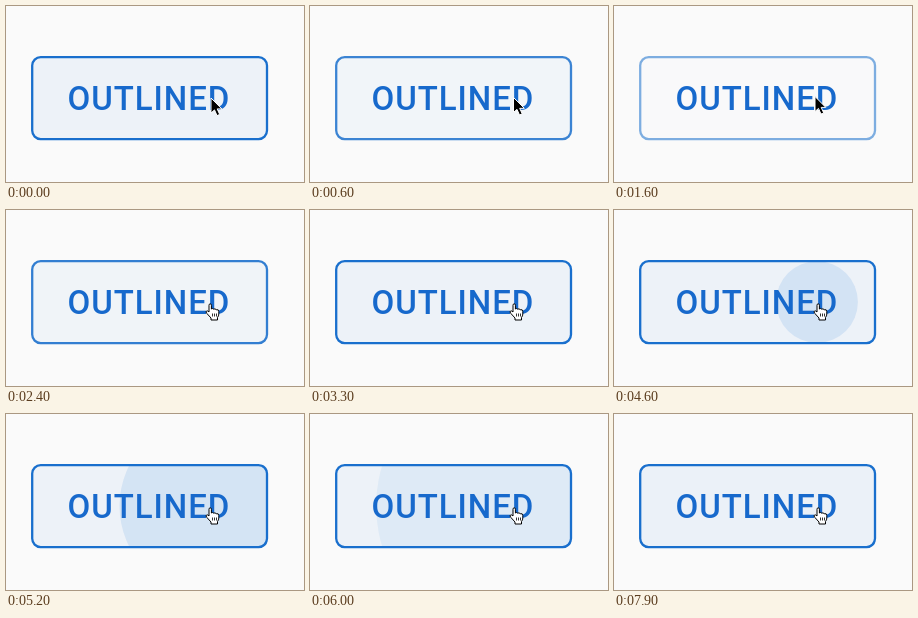
Write an HTML page that moves like this. It is 298 px wide and 176 px high and loops after 8000 ms.

```html
<!DOCTYPE html>
<html lang="en">
<head>
<meta charset="utf-8">
<style>
  html, body { margin: 0; width: 100%; height: 100%; overflow: hidden; background: #fafafa; }
  svg { display: block; width: 298px; height: 176px; }
  text { font: 500 33px Roboto, sans-serif; letter-spacing: .0286em; }
</style>
</head>
<body>
<svg viewBox="0 0 298 176">
  <clipPath id="inside"><rect x="26" y="51" width="235" height="82" rx="8"/></clipPath>
  <g fill="#1769cc">
    <rect id="tint" x="26" y="51" width="235" height="82" rx="8" fill="#1976d2"/>
    <g clip-path="url(#inside)"><circle id="ripple" cx="203" cy="92" fill="#1976d2"/></g>
    <rect id="border" x="26.2" y="51.1" width="234.8" height="82" rx="8.5" fill="none" stroke="#196fcd" stroke-width="2.3"/>
    <text x="61.5" y="104">OUTLINED</text>
  </g>
  <path id="arrow" d="M0 0V15L3.5 11.9L6 17.6L8.7 16.4L6.2 10.9H10.8Z" fill="#000" stroke="#fff"/>
  <g id="hand" transform="translate(199 93)" stroke="#000" stroke-linejoin="round">
    <path d="M4 9V2.3Q4 .8 5.2 .8T6.4 2.3V6Q7.6 4.9 8.8 6.2Q10 5.2 11.2 6.7Q13.8 6 13.8 8.6V11Q13.8 13 12.5 14.4V17H6V15L2 10.6Q.2 8.6 1.5 8T4 9Z" fill="#fff"/>
    <path d="M7.5 10.5V13.5M9.5 10.5V13.5M11.5 10.5V13.5" fill="none" stroke-width=".8"/>
  </g>
</svg>
<script>
const LOOP = 8000, STEP = 100, REENTER = 1500, HAND_AT = 1700;
const el = id => document.getElementById(id);
const set = (id, attrs) => Object.entries(attrs).forEach(([k, v]) => el(id).setAttribute(k, v));

// cubic-bezier(.4, 0, .2, 1), solved by bisection
function ease(x) {
  if (x <= 0) return 0;
  if (x >= 1) return 1;
  let lo = 0, hi = 1;
  for (let i = 0; i < 24; i++) {
    const s = (lo + hi) / 2, r = 1 - s;
    if (1.2 * s * r * r + .6 * s * s * r + s ** 3 < x) lo = s; else hi = s;
  }
  return lo * lo * (3 - 2 * lo);
}
const progress = (t, start, duration) => ease((t - start) / duration);

function hoverAt(t) {
  const out = 1 - progress(Math.min(t, REENTER), -100, 2500);
  return out + (1 - out) * progress(t, REENTER, 1900);
}

function draw(t) {
  const hover = hoverAt(t);
  set('tint', { opacity: .055 * hover });
  set('border', { 'stroke-opacity': .5 + .5 * hover });

  const grow = progress(t, 3155, 5900);
  const fade = progress(t, 3430, 5500);
  set('ripple', { r: 182 * grow, opacity: (.1 + .2 * grow) * (1 - fade) });

  const move = Math.min(t / 1600, 1);
  set('arrow', {
    transform: `translate(${205 - 4 * move} ${92 - 1.5 * move})`,
    visibility: t < HAND_AT ? 'visible' : 'hidden'
  });
  set('hand', { visibility: t < HAND_AT ? 'hidden' : 'visible' });
}

const begin = performance.now();
function tick() {
  const t = (performance.now() - begin) % LOOP;
  draw(Math.floor(t / STEP) * STEP);
  requestAnimationFrame(tick);
}
tick();
</script>
</body>
</html>
```
